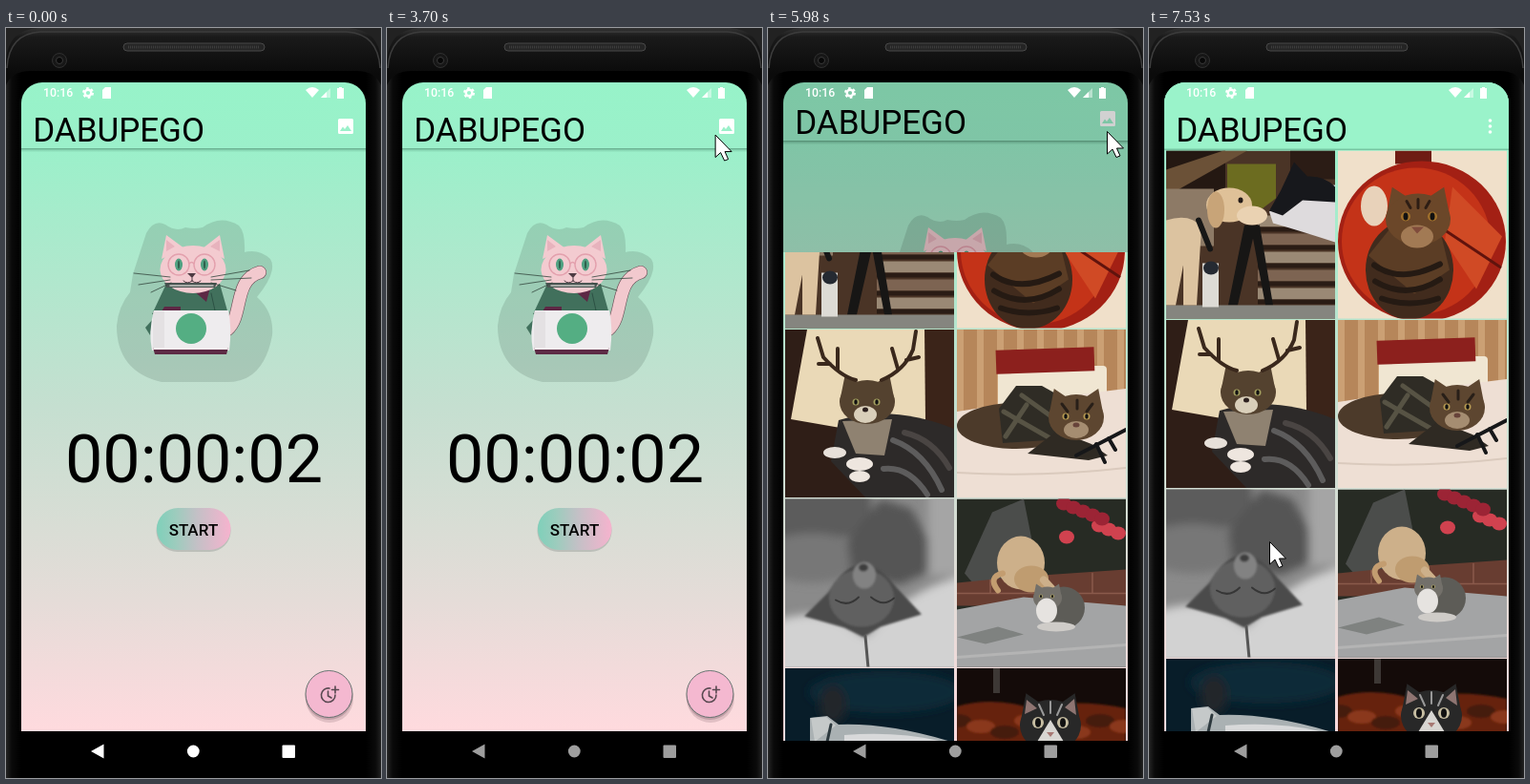
An HTML page that plays this animation: 393 by 786 pixels, repeating every 8000 ms.

```html
<!DOCTYPE html>
<html lang="en">
<head>
<meta charset="utf-8">
<title>Focus timer</title>
<style>
html, body { margin: 0; width: 100%; height: 100%; overflow: hidden; background: #000; }
svg { display: block; font-family: Roboto, sans-serif; }
#stage { width: 393px; height: 786px; }
</style>
</head>
<body>
<svg id="stage" viewBox="0 0 393 786">
  <defs>
    <linearGradient id="sky" x2="0" y2="1">
      <stop stop-color="#97f3c9"/><stop offset=".1" stop-color="#9bf0ca"/>
      <stop offset=".5" stop-color="#c5dfd0"/><stop offset=".8" stop-color="#e5dcd8"/>
      <stop offset="1" stop-color="#ffdade"/>
    </linearGradient>
    <linearGradient id="pill">
      <stop stop-color="#7fd0ba"/><stop offset=".25" stop-color="#9cccbd"/>
      <stop offset=".55" stop-color="#c4c0c6"/><stop offset="1" stop-color="#f6b3ce"/>
    </linearGradient>
    <linearGradient id="shell" x2="0" y2="1">
      <stop stop-color="#333"/><stop offset=".012" stop-color="#1a1a1a"/>
      <stop offset=".06" stop-color="#0b0b0b"/><stop offset=".85" stop-color="#070707"/>
      <stop offset="1" stop-color="#161616"/>
    </linearGradient>
    <linearGradient id="edge">
      <stop stop-color="#242424"/><stop offset=".015" stop-color="#0a0a0a"/>
      <stop offset=".04" stop-color="#000"/><stop offset=".96" stop-color="#000"/>
      <stop offset=".985" stop-color="#0a0a0a"/><stop offset="1" stop-color="#202020"/>
    </linearGradient>
    <filter id="soft"><feGaussianBlur stdDeviation="5"/></filter>
    <filter id="haze"><feGaussianBlur stdDeviation="1"/></filter>
    <clipPath id="glass"><rect x="16" y="57" width="361" height="722" rx="22"/></clipPath>
    <clipPath id="reveal"><rect id="window" x="16" width="361"/></clipPath>
  </defs>

  <rect width="393" height="60" fill="#222"/>
  <path d="M0 786V34Q2 2 34 0H359Q391 2 393 34V786Z" fill="url(#shell)"/>
  <path d="M0 786V60Q6 46 24 45H369Q387 46 393 60V786Z" fill="url(#edge)"/>
  <path d="M1 42Q3 6 36 4H357Q390 6 392 42" fill="none" stroke="#3c3c3c" stroke-width="1.5"/>
  <rect x="123" y="16" width="148" height="8" rx="4" fill="#252525" stroke="#484848"/>
  <path d="M128 20H266" stroke="#3d3d3d" stroke-width="3" stroke-dasharray="1 1"/>
  <circle cx="56" cy="34" r="7.5" fill="#171717" stroke="#303030"/>
  <circle cx="56" cy="34" r="3.5" fill="#080808" stroke="#3a3a3a"/>

  <g clip-path="url(#glass)">
    <rect x="16" y="57" width="361" height="722"/>
    <g id="home"></g>
    <rect id="dim" x="16" y="57" width="361" height="680" opacity="0"/>
    <g clip-path="url(#reveal)"><g id="gallery"></g></g>
    <g fill="#fff">
      <text x="39" y="72" font-size="12.3" font-weight="500">10:16</text>
      <circle cx="86" cy="68" r="3.3" fill="none" stroke="#fff" stroke-width="2.4"/>
      <circle cx="86" cy="68" r="5" fill="none" stroke="#fff" stroke-width="2" stroke-dasharray="2.6 2.64"/>
      <path d="M104 62H110V74H101V65Z"/>
      <path d="M314 65Q321 59 328 65L321 73Z"/>
      <path d="M340 63V73H330Z" opacity=".45"/><path d="M336 67V73H330Z"/>
      <path d="M347 63H349V62H352V63H354V74H347Z"/>
    </g>
    <g id="nav" fill="#fff">
      <path d="M89 758L102.500 750.500V765.500Z"/><circle cx="196.300" cy="758" r="6.400"/>
      <rect x="289.500" y="751.500" width="13.500" height="13.500" rx="1"/>
    </g>
  </g>
  <circle id="ripple" cx="355" cy="108" r="18" fill="#fff" opacity="0"/>
  <path id="cursor" d="M.5 .5V24L6 19L10 27.500L14 26L10.500 18H17.500Z" fill="#fff" stroke="#000"/>
</svg>

<script>
const $ = id => document.getElementById(id);

// Shape helpers
const P = (d, fill, more = '') => `<path d="${d}" fill="${fill}" ${more}/>`;
const L = (d, stroke, width = 1) => P(d, 'none', `stroke="${stroke}" stroke-width="${width}" stroke-linecap="round"`);
const E = (x, y, rx, ry, fill, more = '') => `<ellipse cx="${x}" cy="${y}" rx="${rx}" ry="${ry}" fill="${fill}" ${more}/>`;
const R = (x, y, w, h, fill, more = '') => `<rect x="${x}" y="${y}" width="${w}" height="${h}" fill="${fill}" ${more}/>`;
const T = (x, y, size, text, more = '') => `<text x="${x}" y="${y}" font-size="${size}" ${more}>${text}</text>`;
const blur = (art, kind) => `<g filter="url(#${kind})">${art}</g>`;
const mid = 'text-anchor="middle"';
const title = T(28.2, 119, 35, 'DABUPEGO');
const background = R(16, 57, 361, 680, 'url(#sky)');

const mascot =
  P('M133 258L147 215Q155 200 167 206Q178 214 188 209Q198 211 206 209Q225 195 244 207Q251 214 250 235Q265 231 277 242Q285 255 263 282Q281 298 279 322Q270 371 232 371H163Q116 360 116 312Q118 291 130 277Z', 'rgba(60,85,75,.18)') +
  L('M232 316C249 302 238 264 266 256', '#6b5058', 14) + L('M232 316C249 302 238 264 266 256', '#f2c9ce', 12.8) +
  P('M168 268H224L233 300H153Z', '#41705c') + P('M154 305L146 314L151 322Z', '#41705c') +
  P('M195 274L214 272L210 287ZM166 292H183V297H163Z', '#5d2845') + L('M215 278L219 296', '#2c5144') +
  E(196, 253, 34.500, 25, '#f3cbd0') + P('M163 242L168 217L187 231ZM229 242L224 217L206 231Z', '#f3cbd0') +
  P('M168 222L168 234L177 229ZM224 222L224 234L214 229Z', '#e7b3bd') +
  P('M166 267H221L219 272H168Z', '#4b5653') + L('M172 270H217', '#c7c8c3', 1.5) +
  [181, 208].map(x => E(x, 248, 4, 6.5, '#4fa181') + E(x, 248, 1, 4.5, '#315d4c') +
    `<circle cx="${x}" cy="248" r="11" fill="none" stroke="#e3a0ad" stroke-width="1.4"/>`).join('') +
  L('M192 247Q194.500 244 197 247', '#e3a0ad', 1.4) + P('M190 257H199L195 262Z', '#4d3b43') +
  L('M195 262V265M195 265Q190 269 186 265M195 265Q200 269 204 265', '#4d3b43') +
  L('M172 261L134 257M172 264L139 269M173 267L152 277M215 261L255 254M215 264L257 262M215 267L241 275', '#34473e', .8) +
  P('M155 296H233Q237 314 234 338H153Q149 318 155 296Z', '#eeecee') + R(154, 297, 12, 39, '#dedbdd', 'opacity=".6"') +
  P('M154 335H233L231 342H156Z', '#5d2b45') + L('M155 336H232', '#f5efef', 2) +
  '<circle cx="194" cy="315" r="16" fill="#54ae83"/>';

$('home').innerHTML = background +
  R(16, 126, 361, 1.5, '#4e8b70', 'opacity=".6"') + R(16, 127.5, 361, 2, '#4e8b70', 'opacity=".2"') + title +
  P('M349.500 95H362.500Q364 95 364 96.500V109.500Q364 111 362.500 111H349.500Q348 111 348 109.500V96.500Q348 95 349.500 95ZM350 108H362L358 102L355 106L353 103.500Z', '#fff', 'fill-rule="evenodd"') +
  mascot + T(197, 476, 70, '00:00:02', mid) +
  R(157.500, 505, 78, 44, '#455', 'rx="22" opacity=".22"') + R(158, 503, 77.500, 44, 'url(#pill)', 'rx="22"') +
  T(196.500, 531.500, 17, 'START', mid + ' font-weight="500"') +
  E(339, 703, 25, 25, '#423', 'opacity=".15"') + E(338.500, 700, 25, 25, '#423', 'opacity=".2"') +
  E(338.500, 698, 24.500, 24.500, '#f4b8d0', 'stroke="#446058" stroke-width=".8"') +
  L('M339 692A7.300 7.300 0 1 0 345 699M337.500 695V700L341 702M345 690V697M341.500 693.500H348.500', '#584850', 1.6);

const head = (x, y, w, h, fill) =>
  P(`M${x - w} ${y}L${x - w * .8} ${y - h * 1.25}L${x - w * .25} ${y - h * .8}H${x + w * .25}L${x + w * .8} ${y - h * 1.25}L${x + w} ${y}Z`, fill) + E(x, y, w, h, fill);
const eyes = (x, y, gap, r, fill) =>
  [-gap, gap].map(d => E(x + d, y, r, r, fill) + E(x + d, y, r * .5, r * .8, '#111')).join('');
const rows = (n, f) => Array.from({ length: n }, (_, i) => f(i)).join('');

const photos = [
  // Puppy and cat nose to nose
  R(0, 0, 177, 177, '#4a3426') + R(0, 0, 62, 45, '#241812') + P('M0 20L60 0H85L0 48Z', '#6b5137') +
  R(0, 40, 50, 60, '#8d7a66') + rows(5, i => R(96, 68 + i * 19, 81, 12, i % 2 ? '#7d6452' : '#9a8975') + R(96, 80 + i * 19, 81, 5, '#2a1c15')) +
  P('M64 14H115V50L95 65L64 45Z', '#6c6c20') + R(130, 0, 47, 30, '#2b1c15') +
  P('M65 162L82 78H98L112 162H104L91 92L75 162Z', '#171615') + R(0, 162, 177, 15, '#85857f') + R(38, 118, 17, 46, '#dddbd5') +
  P('M0 73Q25 65 37 80L32 162H18V120L10 162H0Z', '#dcc3a0') + E(66, 57, 24, 18, '#dfc198') + E(90, 68, 16, 10, '#ead2b2') +
  E(52, 62, 9, 19, '#c8a478') + E(78, 52, 2.5, 3, '#241b18') + L('M34 73L46 103', '#171717', 6) + E(47, 123, 8, 7, '#252a32') +
  P('M108 64Q137 40 177 36V96Q140 84 112 76Z', '#dedbdd') + P('M108 63L120 42L134 12L148 27Q166 26 177 38V54L143 52L122 68Z', '#17181c'),

  // Cat in a tunnel
  R(0, 0, 177, 177, '#f0e0ca') + R(60, 0, 38, 14, '#6e1c14') + E(88, 95, 88, 84, '#a32014') + E(82, 95, 78, 77, '#c43318') +
  P('M120 38L172 90L145 145L112 95Z', '#d04a25') + L('M104 78L170 122', '#60130d', 3) +
  E(38, 58, 14, 21, '#e8d2ba') + E(75, 125, 46, 52, '#412b1d') + P('M32 110L60 75H105L117 125L80 150Z', '#5b3d25') +
  head(84, 72, 34, 27, '#6b4729') + E(83, 90, 17, 12, '#a27a54') + eyes(85, 69, 14, 5, '#a0702b') + P('M77 80H90L83 87Z', '#804c3c') +
  L('M38 120Q66 140 107 119M39 137Q72 157 107 135M46 155Q75 165 105 155', '#251a13', 6) + L('M72 53L76 60M84 51V60M96 53L92 60', '#2d1d14', 3),

  // Cat with antlers
  R(0, 0, 177, 177, '#2f1e17') + R(145, 0, 32, 110, '#3b2419') + P('M23 0H146L147 95L75 106L6 94Z', '#ead9b7') +
  P('M56 95Q112 78 177 104V177H85L48 138Z', '#2d2a29') + P('M60 96L112 94L104 132L74 130Z', '#8f8271') +
  head(86, 76, 29, 23, '#54422f') + E(84, 89, 12, 9, '#d9cfba') + eyes(85, 76, 11, 3.5, '#a4a060') + E(84, 84, 3, 2.5, '#2d211f') +
  L('M74 53Q58 49 40 29L34 9M55 43L55 20M47 36L35 36M101 53Q125 43 134 21L137 2M118 41L112 20M127 32L140 29', '#3a281c', 4) +
  E(52, 129, 12, 6, '#e7e0d9') + E(78, 141, 14, 7, '#eee6df') + E(78, 154, 11, 6, '#eee6df') +
  L('M113 116Q146 128 164 168M103 146Q130 143 149 173', '#5d5c5c', 6) + L('M125 108Q155 115 172 145', '#4a4543', 6),

  // Cat in a vest
  R(0, 0, 177, 177, '#b6865a') + rows(9, i => R(i * 21, 0, 7, 90, '#cba074')) + R(43, 38, 114, 43, '#f0e6d2', 'rx="4"') +
  R(41, 20, 103, 25, '#8c201d', 'transform="rotate(-2 92 34)"') + P('M0 86L70 75L177 62V177H0Z', '#eedfd4') +
  L('M0 150Q90 155 177 145', '#dacabd', 2) + E(62, 101, 62, 24, '#4c3a2a') +
  P('M44 83L62 59H89L123 78L110 115L48 119Z', '#2f2c25') + L('M49 86L103 117M68 69L110 99M51 112L73 79', '#575344', 5) +
  P('M74 130L105 106L141 120L158 132L138 137Z', '#2f2a23') + head(125, 92, 29, 24, '#5d4630') + E(125, 105, 13, 9, '#a58d71') +
  eyes(125, 91, 11, 3.5, '#b89c54') + E(125, 100, 3.5, 2.5, '#67433a') + L('M110 78L116 86M126 74V83M142 78L136 86', '#281f18', 3) +
  L('M125 132L177 105M146 120L155 139M159 114L166 126', '#161719', 4),

  // Sleeping cat, grey
  R(0, 0, 177, 177, '#8a8a8a') +
  blur(R(-20, -20, 110, 60, '#5c5c5c') + E(28, 62, 55, 26, '#777') + P('M65 45L100 0L132 10L165 70L120 90L70 80Z', '#555') +
    R(150, -10, 50, 90, '#a5a5a5') + P('M-9 128Q43 108 84 145Q130 92 190 80V190H-9Z', '#d2d2d2'), 'soft') +
  blur(P('M20 123L45 98Q78 42 116 92L143 121L100 134L82 145L62 135Z', '#4c4c4c') + E(80, 104, 34, 30, '#616161') +
    E(83, 80, 12, 14, '#828282') + E(82, 72, 5, 4, '#3c3c3c'), 'haze') +
  L('M53 106Q66 114 77 103M90 103Q103 114 114 104', '#363636', 2) + L('M84 144L87 177', '#555', 3),

  // Two cats in a yard
  R(0, 0, 177, 177, '#272b24') + P('M8 78L37 14L70 0L87 86L20 92Z', '#4b4d4b') + P('M0 88L60 82L177 74V112H0Z', '#683d31') +
  L('M0 99H177M35 85V99M142 78V98M118 99V112', '#8a5a4b', 1.5) + P('M0 116L70 103L177 112V177H0Z', '#a3a4a5') +
  rows(9, i => E(112 + i * 37 % 64, 5 + i * 23 % 42, 8, 7, i % 2 ? '#d0424f' : '#9c2435')) +
  P('M0 145L43 134L70 142L30 152Z', '#7f8280') + L('M0 166L177 153', '#b4b4b4', 3) +
  E(67, 67, 25, 28, '#cdb08a') + E(78, 84, 18, 14, '#bf9c70') + L('M91 85L102 97', '#cdb08a', 8) + L('M48 78Q32 82 43 96', '#c39d70', 6) +
  E(112, 114, 22, 22, '#5d5c57') + head(95, 104, 15, 12, '#73706a') + E(94, 117, 11, 13, '#e6e3e0') + eyes(94, 102, 6, 2, '#a59b63') + E(104, 134, 20, 5, '#cfccc8'),

  // White cat at night
  R(0, 0, 177, 177, '#081d29') + blur(E(105, 25, 80, 22, '#0d2a38') + E(50, 38, 14, 20, '#22262a'), 'soft') +
  P('M26 52L44 50L56 59Q110 57 177 78V177H35L26 77Z', '#aab1b3') + P('M27 52L43 51L53 60L31 77Z', '#c5c9c9') +
  L('M48 59L44 77', '#2d393e', 3) + P('M62 70Q125 65 177 80V177H62Z', '#d8d9da'),

  // Kitten
  R(0, 0, 177, 177, '#140b09') + blur(P('M0 40Q35 30 71 40Q135 32 177 42V177H0Z', '#66240f') +
    rows(8, i => E(i * 25, 55 + i % 3 * 6, 15, 7, i % 2 ? '#8a371a' : '#451a0d')), 'haze') + R(38, 0, 7, 26, '#3d3835') +
  head(98, 60, 32, 27, '#282828') + P('M71 48L73 33L84 42ZM113 41L123 32L125 49Z', '#8f7572') +
  P('M98 54L112 77L98 93L84 77Z', '#d8d6d2') + eyes(98, 57, 13, 6, '#c7bea2') + P('M94 67H102L98 72Z', '#a77873') +
  L('M86 38L91 49M98 35V47M110 38L105 49', '#999', 2)
];

$('gallery').innerHTML = background + R(16, 57, 361, 70, '#9af3ca') + R(16, 126.500, 361, 1.5, '#5faa8b', 'opacity=".6"') + title +
  [97, 103, 109].map(y => E(357.500, y, 1.8, 1.8, '#fff')).join('') +
  photos.map((art, i) =>
    `<svg x="${18 + i % 2 * 180}" y="${128.500 + (i >> 1) * 177.500}" width="177" height="176" overflow="hidden">${art}</svg>`).join('');

// Pointer moves: start, end, number of steps, then the points passed
const moves = [
  [360, 700, 6, [385, 772], [340, 650], [285, 525], [264, 479]],
  [1180, 1450, 5, [272, 440], [300, 290], [326, 155], [336, 104]],
  [1850, 2620, 12, [338, 112], [352, 137], [368, 141], [374, 105], [352, 59], [326, 65], [318, 82]],
  [2690, 3490, 12, [311, 77], [322, 108], [350, 125], [375, 102], [358, 71], [335, 76]],
  [3560, 4330, 12, [330, 87], [345, 114], [362, 121], [375, 97], [355, 72], [333, 80]],
  [4400, 4750, 6, [329, 86], [338, 75], [350, 91], [355, 108]],
  [6570, 6990, 7, [345, 122], [290, 200], [195, 340], [126, 424]],
  [7390, 7530, 3, [126, 455], [126, 538]]
];
const clamp = x => Math.max(0, Math.min(1, x));

function along(points, p) {
  const s = p * (points.length - 1), i = Math.min(points.length - 2, Math.floor(s));
  return points[i].map((v, k) => v + (points[i + 1][k] - v) * (s - i));
}

function pointer(t) {
  const move = moves.filter(m => t >= m[0]).pop();
  if (!move) return [-50, -50];
  const [start, end, count, ...points] = move;
  const step = Math.floor(clamp((t - start) / (end - start)) * (count - 1) + .05);
  return along(points, step / (count - 1));
}

// Window opening: top edge, upward offset, shading and shift of the screen behind
const opening = [[671, 27.500, .09, .7], [475, 20, .14, 4], [235, 10, .18, 8], [115, 4.500, .2, 11], [67, 1.800, .2, 13], [59, .6, .2, 13], [57, 0, .2, 13]];

function draw() {
  const t = performance.now() % 8000;
  const [x, y] = pointer(t);
  $('cursor').setAttribute('transform', `translate(${x} ${y})`);
  $('nav').setAttribute('opacity', 1 - .38 * clamp((t - 360) / 750));
  $('ripple').setAttribute('opacity', t < 5080 ? 0 : .25 * clamp((5490 - t) / 210));

  const [top, offset, shade, shift] = t < 5840 ? [765, 28, 0, 0]
    : opening[Math.min(6, Math.floor((t - 5840) / 66.7 + .05))];
  $('home').setAttribute('transform', `translate(0 ${-shift})`);
  $('dim').setAttribute('opacity', shade);
  $('gallery').setAttribute('transform', `translate(0 ${offset})`);
  $('window').setAttribute('y', top);
  $('window').setAttribute('height', Math.max(0, 737 + offset - top));
  requestAnimationFrame(draw);
}
draw();
</script>
</body>
</html>
```
